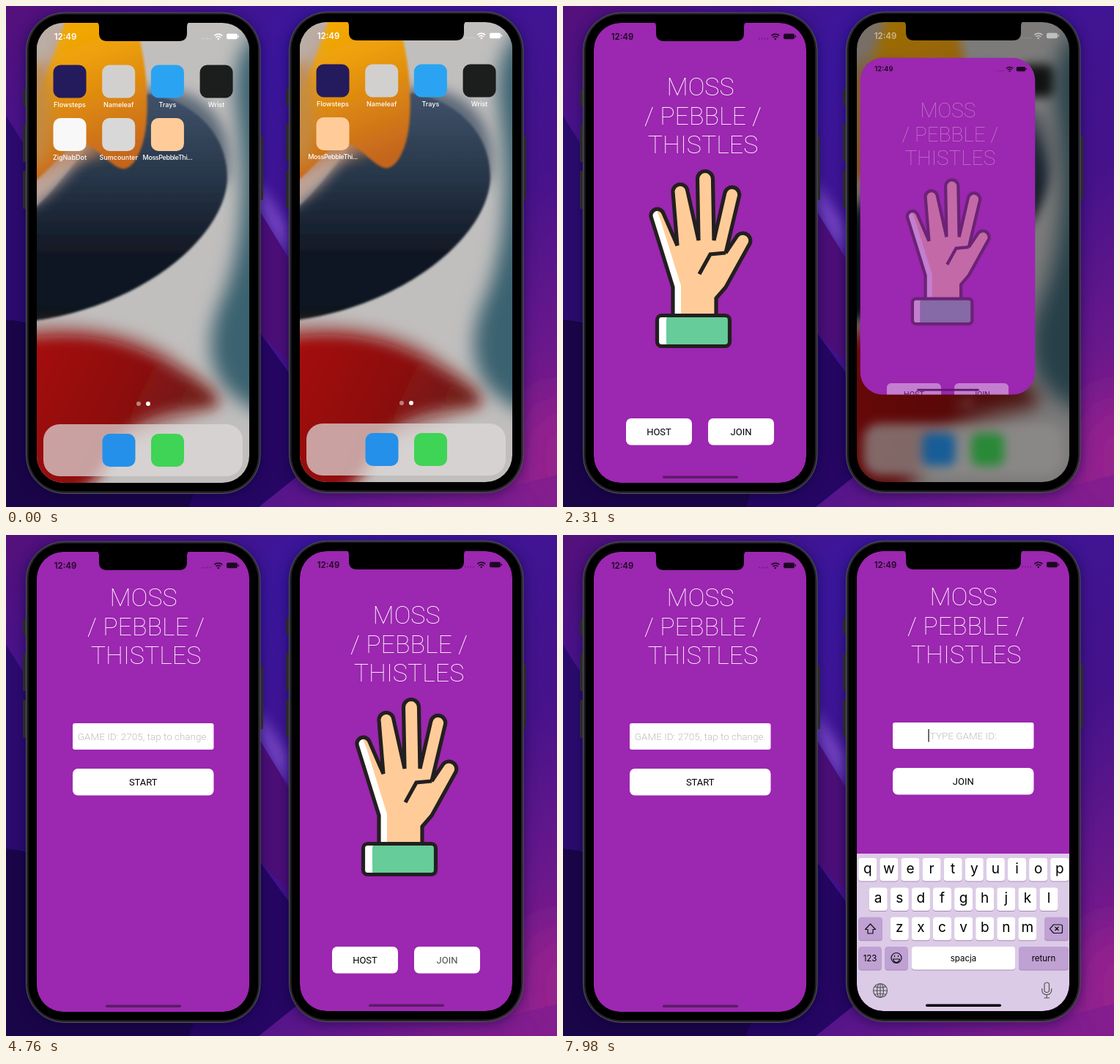
An HTML page for the animation above (8 s loop, 752 by 684 pixels).

```html
<!DOCTYPE html>
<html lang="en">
<head>
<meta charset="utf-8">
<style>
  html, body { margin: 0; width: 100%; height: 100%; overflow: hidden; background: #250a63; }
  svg { display: block; width: 100%; height: 100%; }
  text { font: 13px Roboto, sans-serif; text-anchor: middle; }
  .title { font-size: 34px; font-weight: 100; fill: #fff; }
  .hint { font-size: 13.5px; font-weight: 300; fill: #bdbdbd; }
  .ui { font-family: Inter, sans-serif; }
  .label { font-size: 9px; font-weight: 500; fill: #fff; }
  .clock { font-size: 11.5px; font-weight: 600; }
  .key { font-size: 19px; }
  .small { font-size: 11.5px; }
  .line { fill: none; stroke: #231f20; stroke-width: 5.2; }
</style>
</head>
<body>
<svg id="stage" viewBox="0 0 752 684">
  <defs>
    <filter id="soft2"><feGaussianBlur stdDeviation="1.600"/></filter>
    <filter id="soft9" x="-50%" y="-50%" width="200%" height="200%"><feGaussianBlur stdDeviation="9"/></filter>
    <filter id="soft14" x="-50%" y="-50%" width="200%" height="200%"><feGaussianBlur stdDeviation="13"/></filter>
    <filter id="soft30" x="-100%" y="-100%" width="300%" height="300%"><feGaussianBlur stdDeviation="30"/></filter>
    <linearGradient id="desk" x2="1" y2="1">
      <stop stop-color="#54107a"/><stop offset=".3" stop-color="#3a169c"/>
      <stop offset=".65" stop-color="#45128a"/><stop offset="1" stop-color="#8c1e8c"/>
    </linearGradient>
    <linearGradient id="navy" x2="0" y2="1">
      <stop stop-color="#40526a"/><stop offset=".35" stop-color="#28374a"/>
      <stop offset=".7" stop-color="#111824"/><stop offset="1" stop-color="#0e131e"/>
    </linearGradient>
    <linearGradient id="amber" x2=".25" y2="1">
      <stop stop-color="#f6ae00"/><stop offset=".35" stop-color="#eda008"/><stop offset="1" stop-color="#c4651f"/>
    </linearGradient>
    <linearGradient id="red" x2="1" y2=".4">
      <stop stop-color="#a80a10"/><stop offset=".6" stop-color="#8c0f10"/><stop offset="1" stop-color="#6b2018"/>
    </linearGradient>
    <g id="wall">
      <path fill="#c1bfbe" d="M30 10h315v655H30z"/>
      <path fill="#3a626f" filter="url(#soft14)" d="M360 20C300 60 312 120 318 170C328 260 320 330 299 390C280 430 268 480 298 520Q320 545 360 560Z"/>
      <path fill="#4b5a6c" opacity=".85" filter="url(#soft9)" d="M30 262C90 235 150 120 200 112C270 112 314 160 302 235L270 270L60 300Z"/>
      <path fill="url(#navy)" filter="url(#soft2)" d="M30 282C80 250 140 130 195 120C250 128 302 170 302 235C300 315 185 412 30 431Z"/>
      <path fill="#bfa294" filter="url(#soft9)" d="M20 40L90 20L125 190C100 200 75 255 20 280Z"/>
      <path fill="#b57a50" opacity=".7" filter="url(#soft9)" d="M30 170L150 190L125 208L80 212L30 235Z"/>
      <path fill="url(#amber)" filter="url(#soft2)" d="M85 10H172C190 60 196 120 191 165C186 205 170 225 158 222C140 218 125 190 100 188C82 190 60 225 38 240L44 120Z"/>
      <ellipse cx="44" cy="140" rx="18" ry="80" fill="#c08a48" opacity=".85" filter="url(#soft9)"/>
      <ellipse cx="40" cy="35" rx="28" ry="45" fill="#b9aea6" filter="url(#soft9)"/>
      <path fill="#95524e" opacity=".55" filter="url(#soft9)" d="M20 435C120 425 190 445 235 480C265 500 310 535 290 550L150 600L30 660Z"/>
      <path fill="url(#red)" filter="url(#soft9)" d="M20 455C110 440 180 460 230 495C260 512 296 535 282 545C240 550 190 555 155 590C140 620 130 650 90 670H20Z"/>
    </g>
    <path id="palm" d="M150 422V384L120.500 289A8.700 8.700 0 0 1 137 283L156 327L150 254A10 10 0 0 1 170 253L185 320L183.500 236A10.500 10.500 0 0 1 204.500 236L206 320L220.800 255.500A10 10 0 0 1 240.500 259.500L222 337L237.500 314A10.200 10.200 0 0 1 253.500 327L222 384L209 399V422"/>
    <g id="hand">
      <use href="#palm" fill="#fc9"/>
      <path fill="#fff" d="M150 422V384L121 291Q118 280 127 277L133 292L161 382V422Z"/>
      <use href="#palm" class="line"/>
      <path class="line" d="M222 337L201 339L186 366"/>
      <rect x="128.500" y="422.500" width="99" height="42" rx="6" fill="#6c9"/>
      <path fill="#fff" d="M129 423h16q-4 0-4 6v30q0 6 4 6h-16z"/>
      <rect class="line" x="128.500" y="422.500" width="99" height="42" rx="6"/>
    </g>
    <g id="status">
      <text class="ui clock" x="81" y="45.500">12:49</text>
      <g opacity=".35"><circle cx="268" cy="44.500" r=".9"/><circle cx="271.700" cy="44.500" r=".9"/><circle cx="275.400" cy="44.500" r=".9"/><circle cx="279" cy="44.500" r=".9"/></g>
      <path fill="none" stroke="currentColor" stroke-width="1.700" d="M284.300 40.500a8 8 0 0 1 11 0M286.400 43a5 5 0 0 1 6.800 0"/>
      <circle cx="289.800" cy="45" r="1.200"/>
      <rect x="301" y="37.700" width="15" height="7.600" rx="2"/><rect x="316.700" y="40" width="1.300" height="3" rx=".6"/>
    </g>
  </defs>
  <path fill="url(#desk)" d="M0 0h752v684H0z"/>
  <path fill="#1b0549" d="M0 428Q160 440 300 684H0z"/>
  <path fill="#2c0b6e" d="M0 150L70 260V435L0 428z"/>
  <path fill="#7444c4" filter="url(#soft9)" d="M340 235L386 300V350L340 270z"/>
  <path fill="#4c0f78" d="M340 270L420 400V520L340 440z"/>
  <path fill="#260663" d="M335 430L400 520V640L345 684H250z"/>
  <ellipse cx="752" cy="620" rx="50" ry="90" fill="#96228e" filter="url(#soft30)"/>
  <path fill="#7a1c90" opacity=".6" d="M580 684L752 640V684z"/>
</svg>
<script>
const LOOP = 8000;
const PURPLE = '#9c27b0';
const SCREEN = { x: 42, y: 23, w: 290, h: 628 };
const TITLE = [['MOSS', 187.5], ['/ PEBBLE /', 191], ['THISTLES', 191]];

const tiles = ['#241b5c Flowsteps', '#d2d0ce Nameleaf', '#2aa4f2 Trays', '#1b1e1d Wrist'];
const gameTile = '#ffcc99 MossPebbleThi...';
const phones = [
  { dx: 0, dy: 0, notch: [127, 247], icon: 220, open: 870, push: 3580, press: 'HOST',
    tiles: [...tiles, '#f8f8f8 ZigNabDot', '#d8d8d8 Sumcounter', gameTile],
    hint: 'GAME ID: 2705, tap to change.', action: 'START' },
  { dx: 359, dy: -1, notch: [109, 266], icon: 87, open: 2060, push: 4840, press: 'JOIN',
    tiles: [...tiles, gameTile], hint: 'TYPE GAME ID:', action: 'JOIN', keyboard: true }
];

const clamp = v => Math.max(0, Math.min(1, v));
const mix = (a, b, p) => a + (b - a) * p;
const easeOut = (t, start, duration, power) => 1 - (1 - clamp((t - start) / duration)) ** power;

const rect = (x, y, w, h, rx, fill, more = '') =>
  `<rect x="${x}" y="${y}" width="${w}" height="${h}" rx="${rx}" fill="${fill}" ${more}/>`;
const text = (s, x, y, cls = '', more = '') => `<text class="${cls}" x="${x}" y="${y}" ${more}>${s}</text>`;
const title = y => TITLE.map(([s, x], i) => text(s, x, y + i * 39.5, 'title')).join('');
const button = (s, x, y, w) =>
  rect(x, y, w, 36.5, 7, '#fff') + text(s, x + w / 2, y + 23, '', `data-label="${s}"`);
const pageFill = rect(SCREEN.x, SCREEN.y, SCREEN.w, SCREEN.h + 2, 0, PURPLE);

function homeIcons(list) {
  const icons = list.map((entry, i) => {
    const [color, name] = entry.split(' ');
    const x = 87 + (i % 4) * 66.7, y = i < 4 ? 103 : 175.5;
    const tight = name.endsWith('...') ? 'letter-spacing="-.4"' : '';
    return rect(x - 22.5, y - 22.5, 45, 45, 10, color) + text(name, x, y + 34.5, 'ui label', tight);
  });
  return icons.join('') +
    '<circle cx="181" cy="543" r="3" fill="#fff" opacity=".45"/><circle cx="194" cy="543" r="3" fill="#fff"/>' +
    rect(51, 571, 272, 71, 22, '#dedad8', 'opacity=".72"') +
    rect(131.5, 584, 45, 45, 10, '#2490ea') + rect(198, 584, 45, 45, 10, '#3fd455');
}

function keyboard() {
  const key = (s, x, y, w, cls, fill = '#fff') =>
    rect(x, y + 1, w, 31.5, 4, '#a58bb5') + rect(x, y, w, 31.5, 4, fill) +
    text(s, x + w / 2, y + (cls === 'key' ? 20.5 : 19.5), 'ui ' + cls);
  const tint = '#bfa1d3';
  const rows = [['qwertyuiop', 44.3], ['asdfghjkl', 58.7], ['zxcvbnm', 87.8]];
  const letters = rows.map(([row, x], r) =>
    [...row].map((c, i) => key(c, x + i * 29.1, 442 + r * 40.4, 25, 'key')).join('')).join('');
  return rect(42, 436, 290, 220, 0, '#dccbe7') + letters +
    key('', 44.3, 522.8, 32.5, '', tint) + key('', 298, 522.8, 33, '', tint) +
    key('123', 44.3, 563, 31.5, 'small', tint) + key('', 80.3, 563, 31.5, '', tint) +
    key('spacja', 117, 563, 141, 'small') + key('return', 263, 563, 68, 'small', tint) +
    `<g fill="none" stroke="#111" stroke-width="1.2" stroke-linejoin="round">
      <path d="M60.500 532l7 7.500h-3.500v5.500h-7v-5.500h-3.500zM305.500 538.700l5-5.700h10q2 0 2 2v7.500q0 2-2 2h-10zM312.500 536l5 5m0-5l-5 5"/>
      <circle cx="96" cy="578.500" r="7"/><path d="M91.500 580h9q-1 4.500-4.500 4.500t-4.500-4.500zM93.500 575v2M98.500 575v2"/>
      <g stroke="#555"><circle cx="74" cy="623" r="9.500"/><ellipse cx="74" cy="623" rx="4.500" ry="9.500"/>
      <path d="M64.500 623h19M74 613.500v19M66.500 617.500q7.500 3 15 0M66.500 628.500q7.500-3 15 0"/>
      <rect x="298" y="612" width="6.500" height="13.500" rx="3.200"/><path d="M294.700 620v2q0 6.500 6.500 6.500t6.500-6.500v-2M301.200 628.500v4.500M297.500 633h7.500"/></g>
    </g>`;
}

function phoneMarkup(p, i) {
  const [a, b] = p.notch;
  const sides = [[23, 114, 23], [23, 162, 51], [23, 225, 52], [346, 178, 87]]
    .map(([x, y, h]) => rect(x, y, 5, h, 1.5, '#2b2a30')).join('');
  return `<g id="phone${i}" transform="translate(${p.dx} ${p.dy})">
    <clipPath id="screen${i}">${rect(42, 23, 290, 628, 37, '#000')}</clipPath>
    <clipPath id="window${i}"><rect class="window"/></clipPath>
    ${rect(27, 12, 320, 656, 52, '#0c0230', 'opacity=".5" filter="url(#soft9)"')}
    ${sides}
    ${rect(27.5, 9, 319.5, 656.5, 52, '#242428', 'stroke="#55555b"')}
    ${rect(30.5, 11.500, 313.5, 651, 49, '#000')}
    <g clip-path="url(#screen${i})">
      <g class="home"><use href="#wall"/>${homeIcons(p.tiles)}</g>
      <use class="homeStatus" href="#status" fill="#fff" color="#fff"/>
      <g class="app" clip-path="url(#window${i})">
        ${rect(30, 10, 320, 660, 0, PURPLE)}
        <g class="content">
          <g class="first">${title(122)}<use href="#hand"/>${button('HOST', 86, 563, 90)}${button('JOIN', 198, 563, 90)}</g>
          ${rect(42, 23, 290, 630, 0, '#000', 'class="dim"')}
          <g class="second">${rect(40, 23, 2, 630, 0, '#000', 'opacity=".08"')}${pageFill}${title(97)}
            ${rect(91, 257, 192.5, 36, 3, '#fff')}${text(p.hint, 187.3, 279.5, 'hint')}
            ${rect(139.3, 266, 1.5, 17.5, 0, '#3c3c3c', 'class="caret"')}${button(p.action, 91, 319, 192.5)}</g>
          ${p.keyboard ? `<g class="keyboard">${keyboard()}</g>` : ''}
          <use href="#status" fill="#1c0822" color="#1c0822"/>
          ${rect(136, 641.5, 103, 3.5, 1.7, '#5c1a69', 'class="indicator"')}
        </g>
      </g>
    </g>
    <path d="M${a - 5} 22q5 0 5 6v9q0 11 11 11h${b - a - 22}q11 0 11-11v-9q0-6 5-6z"/>
  </g>`;
}

const stage = document.getElementById('stage');
stage.insertAdjacentHTML('beforeend', phones.map(phoneMarkup).join(''));
phones.forEach((p, i) => {
  const root = document.getElementById('phone' + i);
  p.get = selector => root.querySelector(selector);
});

function setAttrs(el, attrs) {
  for (const name in attrs) el.setAttribute(name, attrs[name]);
}

function caretOpacity(t) {
  if (t < 6440) return 0;
  return t < 7300 ? 1 - clamp((t - 6950) / 190) : clamp((t - 7300) / 190);
}

function drawPhone(p, t) {
  // The app window grows out of its icon; its edges settle at different rates.
  const opening = easeOut(t, p.open, 650, 3.2);
  const left = mix(p.icon - 22.5, SCREEN.x, opening);
  const right = mix(p.icon + 22.5, SCREEN.x + SCREEN.w, opening);
  const top = mix(153, SCREEN.y, opening ** 2);
  const bottom = mix(198, SCREEN.y + SCREEN.h, opening ** 1.3);
  const scale = (right - left) / SCREEN.w;
  setAttrs(p.get('.window'), { x: left, y: top, width: right - left, height: bottom - top, rx: 10 + 26 * opening });
  p.get('.app').style.opacity = clamp(opening * 4);
  setAttrs(p.get('.content'), {
    transform: `translate(${left} ${top}) scale(${scale}) translate(${-SCREEN.x} ${-SCREEN.y})`
  });
  setAttrs(p.get('.indicator'), { y: SCREEN.y + (bottom - top) / scale - 9.5 });

  const home = p.get('.home');
  home.style.display = opening === 1 ? 'none' : '';
  home.style.filter = opening ? `blur(${9 * opening}px) brightness(${1 - .45 * opening})` : 'none';
  p.get('.homeStatus').style.opacity = 1 - .6 * opening;

  const push = easeOut(t, p.push, 600, 3.37);
  const first = p.get('.first');
  first.style.opacity = clamp((t - p.open - 130) / 300);
  setAttrs(first, { transform: `translate(${-87 * push} 0)` });
  p.get('.dim').style.opacity = .1 * push;
  setAttrs(p.get('.second'), { transform: `translate(${(SCREEN.w + 3) * (1 - push)} 0)` });
  const pressed = t >= p.push - 150 && t < p.push + 20;
  p.get(`.first [data-label=${p.press}]`).style.opacity = pressed ? .7 : 1;

  p.get('.caret').style.opacity = p.keyboard ? caretOpacity(t) : 0;
  if (p.keyboard) {
    const rise = easeOut(t, 7590, 380, 3);
    setAttrs(p.get('.keyboard'), { transform: `translate(0 ${220 * (1 - rise)})` });
    setAttrs(p.get('.indicator'), { fill: rise > .1 ? '#000' : '#5c1a69' });
  }
}

const start = performance.now();
function frame() {
  const t = (performance.now() - start) % LOOP;
  phones.forEach(p => drawPhone(p, t));
  requestAnimationFrame(frame);
}
frame();
</script>
</body>
</html>
```
